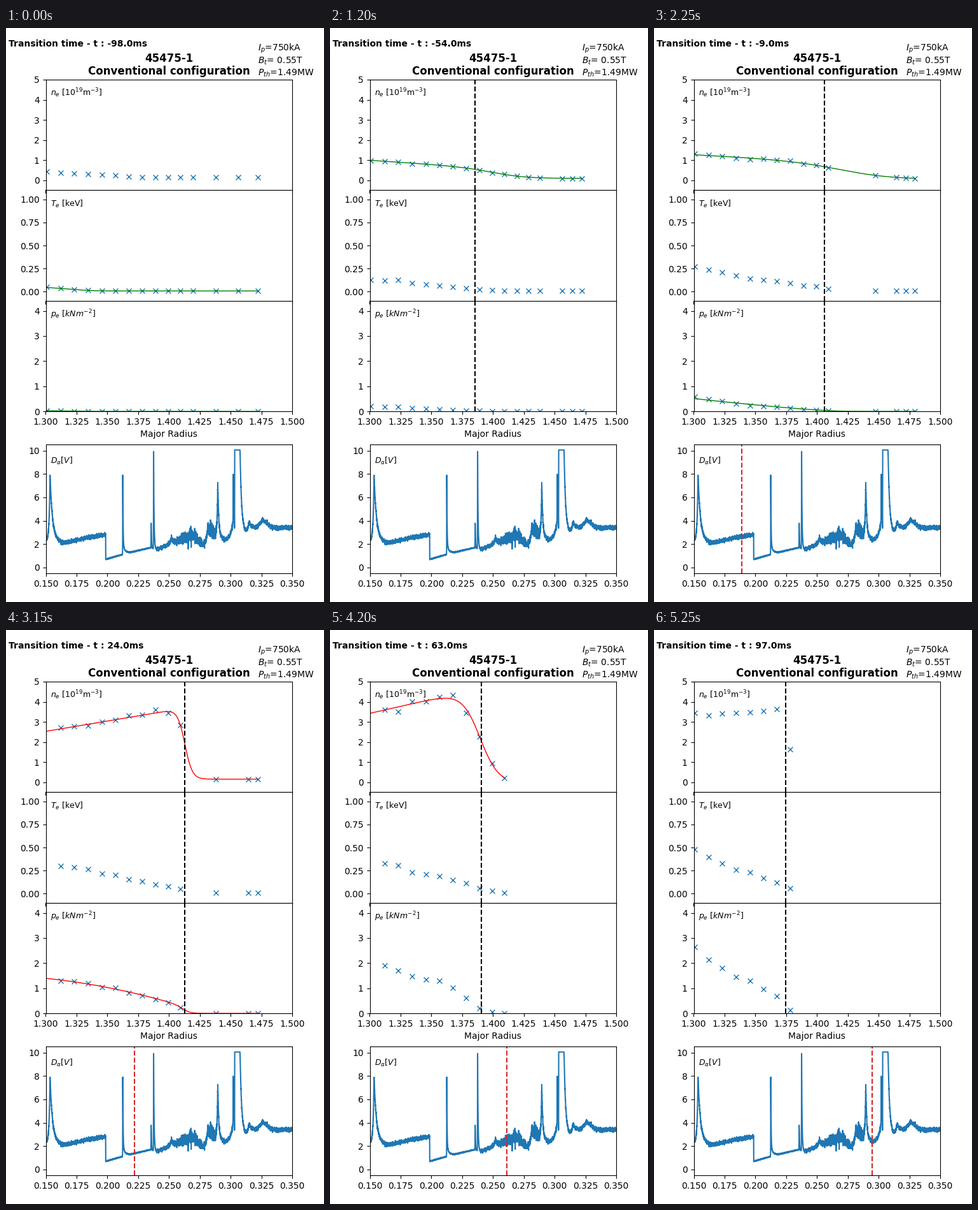
Recreate the animation shown at these times as a matplotlib script. Size 500 px wide and 900 px high, loop 5.4 s.

```python
import numpy as np
import matplotlib.pyplot as plt
from matplotlib.animation import FuncAnimation

W, H, N = 500, 900, 36
BLUE = "tab:blue"

# Plasma states that the loop passes through:
# step, time (ms), edge radius, last channel,
# density pedestal: offset, height, slope, centre, width
STATES = np.array([
    (0, -98, 1.3250, 17, .15, .05, 3.0, 1.370, .0100),
    (4, -70, 1.3750, 14, .16, .40, 2.75, 1.409, .0008),
    (8, -54, 1.3855, 17, .09, .48, 4.0, 1.405, .0140),
    (15, -9, 1.4061, 18, .05, .81, 3.29, 1.425, .0210),
    (21, 24, 1.4128, 17, .15, 3.54, -10.3, 1.4128, .0030),
    (28, 63, 1.3906, 10, -.10, 4.77, -14, 1.389, .0075),
    (35, 97, 1.3747, 7, .10, 3.65, -5, 1.3777, .0025),
])
STEPS = STATES[:, 0]
# Quantities with a fitted curve in each state: n, T, p
FITTED = ["Tp", "n", "n", "np", "np", "n", ""]

CHANNEL = np.arange(19)
RADII = 1.3006 + .0113 * CHANNEL - 4.2e-6 * CHANNEL**3


def density(r, off, height, slope, mid, width):
    return off + (height + slope * (mid - r)) / (1 + np.exp((r - mid) / width))


def temperature(r, t, edge):
    """Ramp that flattens just outside the edge and steepens with time."""
    w = .005
    return .007 + 2.2 * np.exp(t / 125) * w * np.logaddexp(0, (edge + .014 - r) / w)


def profiles(r, t, edge, ped):
    ne, te = density(r, *ped), temperature(r, t, edge)
    return ne, te


def pressure(ne, te):
    return 1.602 * ne * te


def active(rng, t, last):
    """Inner channels always report, outer ones only now and then."""
    on = (CHANNEL <= 10) | (rng.random(CHANNEL.size) < .5)
    on[0] = not 0 < t < 80
    on[last] = True
    return on & (CHANNEL <= last)


def burst(t, start, height, rise, fall, hold=0):
    d = np.where(t < start, (start - t) / rise,
                 np.maximum(t - start - hold, 0) / fall)
    return height * np.exp(-d)


def bump(t, mid, width):
    return np.exp(-((t - mid) / width)**2)


def d_alpha():
    rng = np.random.default_rng(7)
    t = np.linspace(150, 350, 4001)
    y = np.interp(t, *np.transpose([
        (150, 2.4), (166, 2.1), (178, 2.45), (198.6, 2.8), (198.7, .7),
        (212, 1.1), (235, 1.7), (240, 1.5), (255, 2.2), (270, 2.8),
        (278, 1.9), (284, 3.1), (296, 2.3), (313, 3.0), (322, 3.5),
        (326, 4.1), (334, 3.4), (350, 3.4)]))
    for b in [(153.5, 5.5, .7, 2), (212.5, 6, .05, .25), (212.5, .8, .05, 2),
              (235.5, 2.1, .05, .3), (237.5, 7.7, .05, .35),
              (237.5, .6, .05, 1), (252, .5, 1, 1), (281.4, .9, .6, 1),
              (289.6, 4.5, .5, .8), (302.2, 3.8, .1, .1),
              (303, 2.2, 2, .1), (303.3, 12, .03, 1.3, 3.7),
              (315, .8, 1, 2)]:
        y += burst(t, *b)
    quiet = (t > 198.6) & (t < 240)
    sigma = np.where(quiet, .02, .09 + .2 * bump(t, 267, 9) + .22 * bump(t, 285, 4))
    y += rng.normal(0, sigma)
    return t / 1e3, np.minimum(y, 10.05)


fig = plt.figure(figsize=(W / 100, H / 100), dpi=100, facecolor="white")


def panel(bottom, height, xlim, ylim, yticks):
    ax = fig.add_axes([.125, bottom, .775, height])
    ax.set(xlim=xlim, ylim=ylim, yticks=yticks, xticks=np.linspace(*xlim, 9))
    return ax


def label(x, y, s, size=10, **kw):
    return fig.text(x / W, 1 - y / H, s, fontsize=size, **kw)


R, LOW, TOP = (1.3, 1.5), .332, .91
h = (TOP - LOW) / 3
axes = [
    panel(LOW + 2 * h, h, R, (-.5, 5), range(6)),
    panel(LOW + h, h, R, (-.1, 1.1), np.arange(5) / 4),
    panel(LOW, h, R, (0, 4.4), range(5)),
]
for ax in axes[:2]:
    ax.tick_params(labelbottom=False)
axes[0].set_title("45475-1\nConventional configuration", fontweight="bold",
                  linespacing=1.13)
axes[2].set_xlabel("Major Radius")

trace = panel(.05, .224, (.15, .35), (-.5, 10.5), range(0, 11, 2))
trace.plot(*d_alpha(), color=BLUE, lw=1.5)
cursor = trace.axvline(.1, color="tab:red", ls="--", lw=1.5)

label(70.3, 106.5, r"$n_e$ [$10^{19}$m$^{-3}$]", 9)
label(70.3, 279.5, r"$T_e$ [keV]", 9)
label(70.3, 453, r"$p_e$ $[kNm^{-2}]$", 9)
label(70.3, 682.5, r"$D_{\alpha}[V]$", 9)
label(396, 35.3, r"$I_p$=750kA")
label(396, 55.7, r"$B_t$= 0.55T")
label(396, 74.3, r"$P_{th}$=1.49MW")
clock = label(4.4, 29, "", fontweight="bold")

points = [ax.plot([], [], "x", color=BLUE)[0] for ax in axes]
curves = [ax.plot([], [], lw=1)[0] for ax in axes]
edges = [ax.axvline(1.375, color="k", ls="--", lw=1.5) for ax in axes]


def draw(i):
    t, edge, last, *ped = [np.interp(i, STEPS, c) for c in STATES.T[1:]]
    t, last = round(t), round(last)
    near = np.abs(STEPS - i).argmin()
    rng = np.random.default_rng(i)

    clock.set_text(f"Transition time - t : {t:.1f}ms")
    cursor.set_xdata([.1981 + .000998 * t] * 2)

    on = active(rng, t, last)
    ne, te = profiles(RADII, t, edge, ped)
    ne = ne * rng.normal(1, .03, ne.size)
    te = te * rng.normal(1, .06, te.size)

    r = np.linspace(1.3, RADII[last], 400)
    ne_fit, te_fit = profiles(r, t, edge, ped)

    data = ne, te, pressure(ne, te)
    fits = ne_fit, te_fit, pressure(ne_fit, te_fit)
    for k, name in enumerate("nTp"):
        points[k].set_data(RADII[on], data[k][on])
        curves[k].set_data(r, fits[k])
        curves[k].set_visible(name in FITTED[near])
        curves[k].set_color("red" if t > 0 else "green")
        edges[k].set_xdata([edge] * 2)
        edges[k].set_visible(bool(near > 0))
    return [clock, cursor, *points, *curves, *edges]


anim = FuncAnimation(fig, draw, frames=N, interval=5400 / N, repeat=True,
                     repeat_delay=0, blit=False)
plt.show()
```
